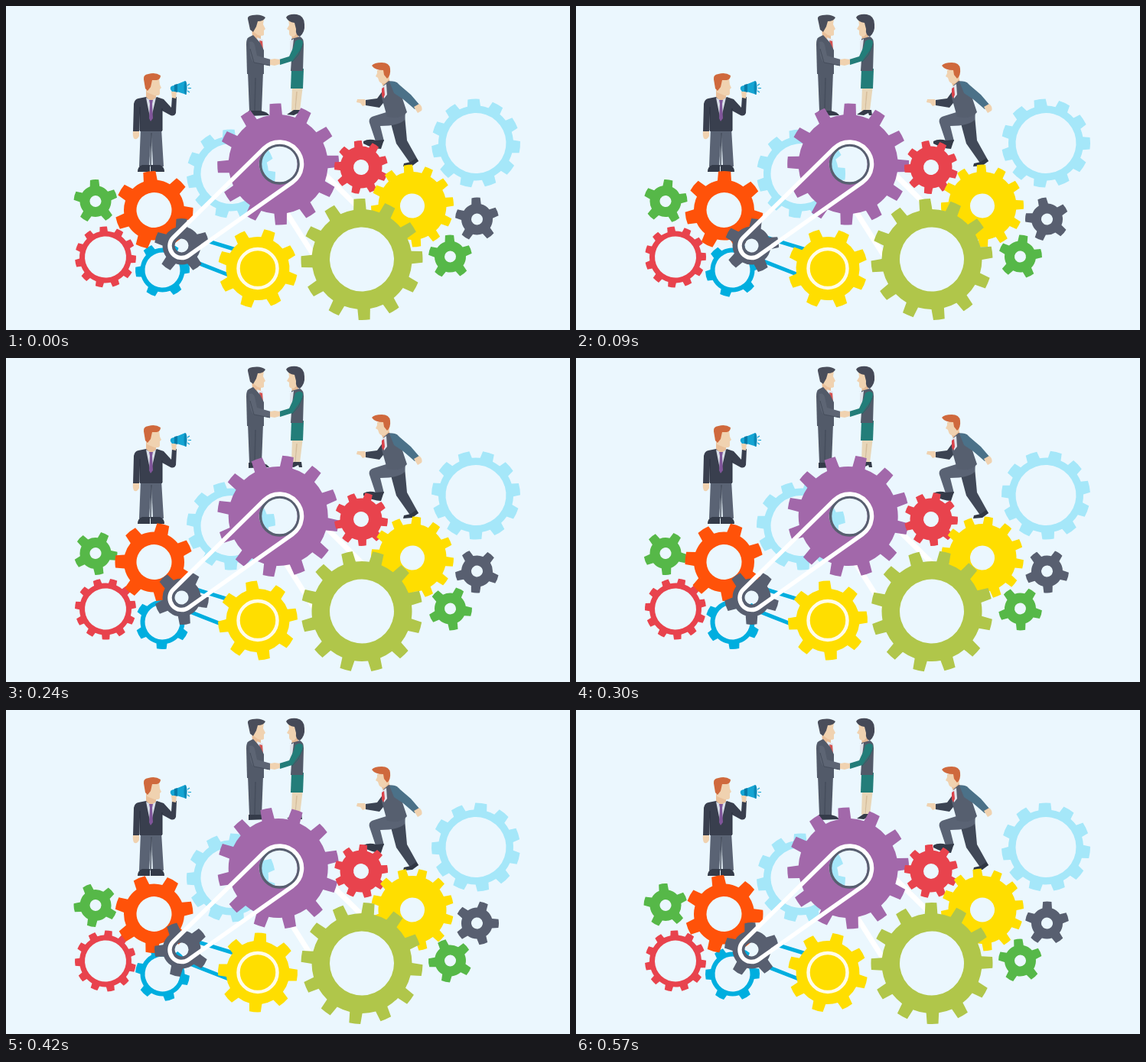
Recreate the animation shown at these times as an HTML page. Size 737 px wide and 424 px high, loop 600 ms.

```html
<!DOCTYPE html>
<html lang="en">
<head>
<meta charset="utf-8">
<title>Teamwork gears</title>
<style>
  html, body { margin: 0; width: 100%; height: 100%; overflow: hidden; background: #ebf7fe; }
  svg { display: block; width: 100vw; height: 100vh; }
</style>
</head>
<body>
<svg id="stage" viewBox="0 0 737 424">
  <g id="back"></g>

  <g id="links" fill="none">
    <path d="M350 244L405 331M400 204L476 279" stroke="#fff" stroke-width="7"/>
    <path d="M236 299L304 320M235 330L296 354" stroke="#00aedf" stroke-width="5"/>
  </g>

  <g id="speaker">
    <path d="M176 160H203L206 210H192L190 168L187 210H174Z" fill="#5a6374"/>
    <path d="M190 166L189 210" stroke="#474f5e" stroke-width="1.5"/>
    <path d="M172 217Q172 210 178 208H188V217ZM189 217V208H201Q207 210 207 217Z" fill="#343b49"/>
    <path d="M166 163H174V170Q172 175 168 174Q165 172 166 163Z" fill="#f0d2b0"/>
    <path d="M183 110H196V122L190 128L183 122Z" fill="#e9bf99"/>
    <path d="M173 121L183 119L190 126L197 119L206 122L216 133L217 119H223L222 140Q220 145 215 143L204 137V164H175V140L174 164H166L167 128Q168 122 173 121Z" fill="#393f4e"/>
    <path d="M183 120L189 150L196 120L190 124Z" fill="#d8dfe8"/>
    <path d="M187 123H192L191 128L192 147L189 151L187 147L188 128Z" fill="#80559a"/>
    <path d="M175 132V163M204 134V163" stroke="#2b313e" stroke-width="1"/>
    <path d="M182 97L200 94L201 103L203 107L201 109V115Q200 118 194 117L184 113Z" fill="#f0d2b0"/>
    <path d="M180 96Q179 90 186 89Q195 86 202 91Q202 96 197 97H191L189 106L185 111L182 108Z" fill="#cf693d"/>
    <path d="M217 120L216 112Q219 109 223 113L222 121Z" fill="#f0d2b0"/>
    <path d="M216 105L222 103L234 98L236 116L223 112L217 112Q213 108 216 105Z" fill="#15a5d3"/>
    <path d="M220 103L224 102V113L220 112Z" fill="#087ba8"/>
    <ellipse cx="234.5" cy="107" rx="2" ry="9" fill="#0989b8"/>
    <path d="M237 104L240 102M238 107.5H242M237 111L240 113" stroke="#15a5d3" stroke-width="1.2"/>
  </g>

  <g id="handshake">
    <path d="M316 86H336L334 138H318Z" fill="#525a69"/>
    <path d="M326 94L325 138" stroke="#464e5d" stroke-width="1.5"/>
    <path d="M317 144V137H333Q342 139 344 143Z" fill="#343b49"/>
    <path d="M321 29H333V43L329 48L322 40Z" fill="#e9bf99"/>
    <path d="M320 18L337 17L336 24L339 30L337 32V38Q334 40 329 38L321 32Z" fill="#f0d2b0"/>
    <path d="M316 17Q315 13 322 12Q333 10 339 15Q337 20 329 20L327 27L323 34L319 31Z" fill="#4a4e5b"/>
    <path d="M328 41L336 44V65L330 58Z" fill="#e1e6ed"/>
    <path d="M331 45L335 46L336 58L333 56Z" fill="#d65352"/>
    <path d="M317 41L323 38L332 48L337 58V89H315L314 50Q314 43 317 41Z" fill="#525a69"/>
    <path d="M318 47Q323 45 325 51L328 65L346 70L345 78L324 74Q321 72 319 64Z" fill="#5d6574"/>
    <path d="M319 56L324 74L345 78" fill="none" stroke="#454d5b" stroke-width="1"/>

    <path d="M374 104H388L384 137H379L380 114L377 137H373Z" fill="#e8d6b8"/>
    <path d="M380 112L378 137" stroke="#d5bd9b" stroke-width="1.5"/>
    <path d="M367 142L376 136H386L387 143H383L382 140L376 143Z" fill="#343b49"/>
    <path d="M373 82H389L388 108H372Z" fill="#237d79"/>
    <path d="M373 33H382V46L374 49Z" fill="#e4b994"/>
    <path d="M369 17L381 16L383 33L376 40Q370 40 370 36V32L367 30L370 25Z" fill="#f0d2b0"/>
    <path d="M366 15Q369 10 380 11Q390 13 390 24Q391 34 384 40Q378 38 379 30L377 22Q369 21 366 15Z" fill="#454957"/>
    <path d="M373 43L384 40Q389 42 389 50L388 85H372L373 70Z" fill="#525a69"/>
    <path d="M371 46L376 43L374 60L371 63Z" fill="#e1e6ed"/>
    <path d="M378 46Q385 41 388 47Q388 53 382 61L374 72L358 77L357 70L370 66L376 53Z" fill="#237d79"/>
    <path d="M387 52L382 64L374 73" fill="none" stroke="#206b69" stroke-width="1"/>
    <path d="M345 70L351 69L358 70V76L351 78L345 77Z" fill="#f0d2b0"/>
  </g>

  <g id="runner">
    <path d="M501 138L521 143L524 176L539 203L529 207L510 180L502 150Z" fill="#414958"/>
    <path d="M519 210L520 206L529 204L536 199L539 203L531 209Z" fill="#303744"/>
    <path d="M497 139H522L521 149Q513 157 489 157L494 177L484 180L475 153Q473 146 481 144Z" fill="#5a6374"/>
    <path d="M467 177Q474 173 484 176L494 175L490 187Q480 187 467 180Z" fill="#343b49"/>
    <path d="M459 122L469 122L472 129L466 131L463 127L458 126Z" fill="#f0d2b0"/>
    <path d="M470 123L485 121L493 110L497 122L488 133L470 130Z" fill="#3b4352"/>
    <path d="M487 92H500L502 102L494 108Z" fill="#e9bf99"/>
    <path d="M493 104L500 98L511 100L524 139Q516 149 498 145L491 120Z" fill="#565f6f"/>
    <path d="M491 106L497 102L498 116L494 121Z" fill="#e1e6ed"/>
    <path d="M491 108L494 106L495 116L493 121L491 117Z" fill="#d9444c"/>
    <path d="M501 99Q509 97 515 104L529 116L541 130L534 135L519 122L507 114Z" fill="#4b7188"/>
    <path d="M533 132L540 128Q545 132 543 137L538 140Z" fill="#f0d2b0"/>
    <path d="M485 84L500 83L501 95L495 101Q488 102 487 97L486 94L483 92L485 88Z" fill="#f0d2b0"/>
    <path d="M478 78Q481 74 491 74Q501 74 502 82Q503 91 498 95L494 90L493 84Q482 84 478 78Z" fill="#cf693d"/>
  </g>

  <g id="front"></g>
  <circle cx="329" cy="343.5" r="25.5" fill="none" stroke="#fffce8" stroke-width="4.5"/>
  <g id="top"></g>
  <circle cx="357.5" cy="207" r="25" fill="none" stroke="#585f70" stroke-width="3.5"/>
  <path id="belt" fill="none" stroke="#fff" stroke-width="5.5"/>
</svg>

<script>
const LOOP = 600, STEP = 30;
const byId = id => document.getElementById(id);
const polar = (x, y, r, a) =>
  `${(x + r * Math.cos(a)).toFixed(2)} ${(y + r * Math.sin(a)).toFixed(2)}`;

// Gear outline around the origin, first tooth pointing up
function gearPath({ teeth, tip, body, hole, width }) {
  const root = Math.asin(width / 2 / body), crown = Math.asin(width * .45 / tip);
  let d = '';
  for (let i = 0; i < teeth; i++) {
    const a = i * 2 * Math.PI / teeth - Math.PI / 2;
    const start = polar(0, 0, body, a - root);
    d += i ? `A${body} ${body} 0 0 1 ${start}` : `M${start}`;
    d += `L${polar(0, 0, tip, a - crown)}A${tip} ${tip} 0 0 1 ${polar(0, 0, tip, a + crown)}`;
    d += `L${polar(0, 0, body, a + root)}`;
  }
  d += `A${body} ${body} 0 0 1 ${polar(0, 0, body, -Math.PI / 2 - root)}Z`;
  if (hole) d += `M${hole} 0A${hole} ${hole} 0 1 0 ${-hole} 0A${hole} ${hole} 0 1 0 ${hole} 0Z`;
  return d;
}

const gears = [];
// dir: 1 clockwise, -1 counterclockwise; phase in degrees at time 0
function addGear(layer, color, x, y, dir, phase, shape) {
  const el = document.createElementNS('http://www.w3.org/2000/svg', 'path');
  el.setAttribute('d', gearPath(shape));
  el.setAttribute('fill', color);
  el.setAttribute('fill-rule', 'evenodd');
  byId(layer).append(el);
  gears.push({ el, x, y, phase, pitch: dir * 360 / shape.teeth });
}

const pale = { teeth: 11, tip: 58, body: 49, hole: 39.5, width: 17 };
const small = { teeth: 5, tip: 28.5, body: 20.5, hole: 7.5, width: 12.5 };
const NAVY = '#585f70', YELLOW = '#ffde00', GREEN = '#56b848', RED = '#e8434d';

addGear('back', '#a5e7f9', 294, 219.5, -1, -3, pale);
addGear('back', '#a5e7f9', 614, 179.5, -1, -3, pale);

addGear('front', '#a268aa', 355.7, 207, 1, -2.7,
  { teeth: 12, tip: 79.5, body: 65, hole: 25, width: 16.5 });
addGear('front', RED, 464, 211, -1, -7,
  { teeth: 9, tip: 35, body: 27.5, hole: 10, width: 11 });
addGear('front', YELLOW, 531, 261.5, 1, -6,
  { teeth: 12, tip: 54, body: 44.5, hole: 16, width: 12.5 });
addGear('front', '#b0c64a', 465, 331.5, -1, -2.3,
  { teeth: 12, tip: 79.5, body: 65.5, hole: 42, width: 16.5 });
addGear('front', GREEN, 580.5, 328, 1, -2, small);
addGear('front', NAVY, 615.5, 279, -1, -3, small);
addGear('front', GREEN, 117, 255.5, 1, -3, small);
addGear('front', RED, 130, 328.5, -1, -4,
  { teeth: 11, tip: 40, body: 34, hole: 27, width: 10.5 });
addGear('front', '#00aedf', 204.5, 345.5, -1, 26,
  { teeth: 6, tip: 35.5, body: 29, hole: 23, width: 14 });
addGear('front', '#ff5209', 193.5, 267, 1, -7,
  { teeth: 7, tip: 51, body: 39.5, hole: 23, width: 18 });
addGear('front', YELLOW, 329, 343.5, 1, 17.5,
  { teeth: 8, tip: 52, body: 41.5, hole: 0, width: 16.5 });
addGear('top', NAVY, 229.5, 313.5, 1, 0,
  { teeth: 5, tip: 35.5, body: 25, hole: 9, width: 15.5 });

// Belt: outer tangents around two pulleys
function beltPath(a, b) {
  const dx = b.x - a.x, dy = b.y - a.y, axis = Math.atan2(dy, dx);
  const spread = Math.acos((a.r - b.r) / Math.hypot(dx, dy));
  const at = (c, side) => polar(c.x, c.y, c.r, axis + side * spread);
  return `M${at(a, -1)}A${a.r} ${a.r} 0 1 0 ${at(a, 1)}` +
    `L${at(b, 1)}A${b.r} ${b.r} 0 0 0 ${at(b, -1)}Z`;
}
byId('belt').setAttribute('d',
  beltPath({ x: 357.5, y: 207, r: 29 }, { x: 229.5, y: 314, r: 15.5 }));

// Every gear advances by one tooth per loop
function draw(time) {
  const progress = Math.floor(time % LOOP / STEP) * STEP / LOOP;
  for (const { el, x, y, phase, pitch } of gears) {
    el.setAttribute('transform', `translate(${x} ${y}) rotate(${phase + pitch * progress})`);
  }
}

let start;
function tick(now) {
  start ??= now;
  draw(now - start);
  requestAnimationFrame(tick);
}
draw(0);
requestAnimationFrame(tick);
</script>
</body>
</html>
```
